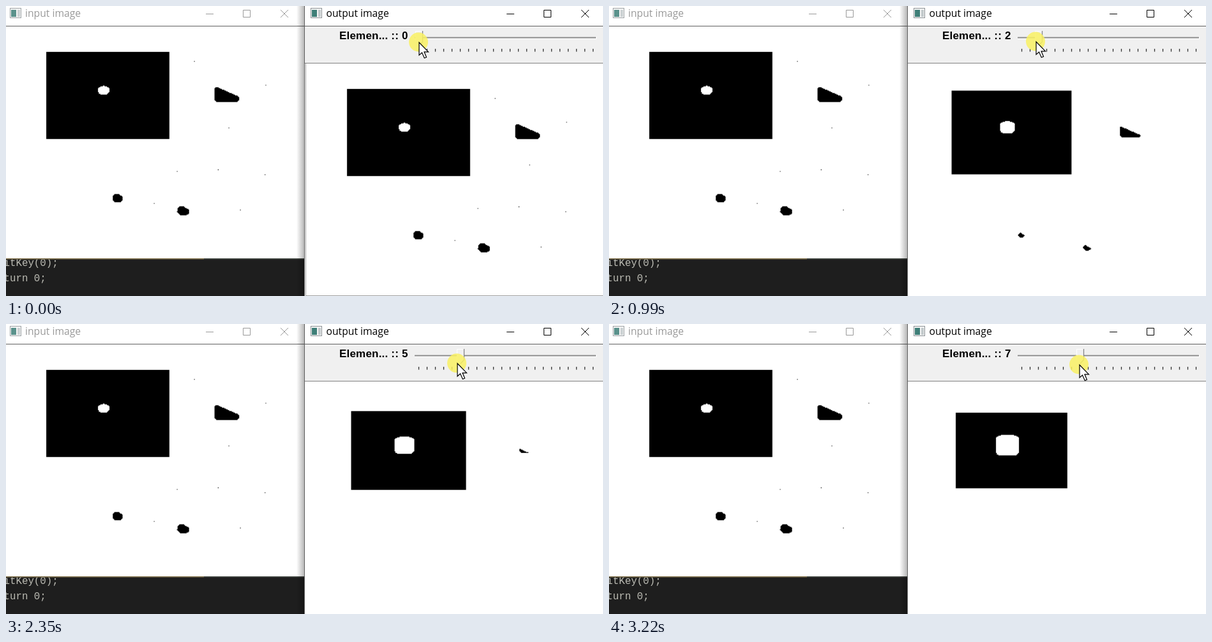
An HTML page with a canvas for the animation above (3.43 s loop, 935x454 px).

```html
<!DOCTYPE html>
<html lang="en">
<head>
<meta charset="utf-8">
<title>Dilation slider</title>
<style>
  html, body { margin: 0; width: 100%; height: 100%; overflow: hidden; background: #fff; }
  canvas, svg { position: absolute; display: block; }
  #inputView { left: 0; top: 32px; }
  #outputView { left: 471px; top: 90px; }
  svg { left: 0; top: 0; }
  text { white-space: pre; }
  .title { font: 15.7px "Open Sans", "Noto Sans", sans-serif; }
  .label { font: bold 17px "Liberation Sans", sans-serif; letter-spacing: .2px; }
  .code { font: 15.8px "Liberation Mono", monospace; fill: #bcbcb4; }
</style>
</head>
<body>
<canvas id="inputView" width="466" height="363"></canvas>
<canvas id="outputView" width="464" height="364"></canvas>
<svg width="935" height="454" viewBox="0 0 935 454">
  <defs>
    <linearGradient id="shade">
      <stop offset="0" stop-color="#000" stop-opacity="0"/>
      <stop offset="1" stop-color="#000" stop-opacity=".28"/>
    </linearGradient>
    <g id="icon">
      <rect x=".5" y=".5" width="17" height="15" fill="#f4f4f4" stroke="#8c9296"/>
      <rect x="2" y="3" width="8" height="11" fill="#3f7f78"/>
      <rect x="12" y="3" width="4" height="11" fill="#c3cacc"/>
    </g>
    <g id="buttons" fill="none">
      <path d="M0 12.5H12M58.500 6.500H69.500V17.500H58.500ZM117 6L129 18M129 6L117 18"/>
    </g>
  </defs>

  <!-- editor behind the windows -->
  <rect y="396" width="467" height="58" fill="#1e1e1e"/>
  <text class="code" x="-22.5" y="407">waitKey(0);</text>
  <text class="code" x="-22.5" y="431">return 0;</text>

  <!-- input window -->
  <rect width="467" height="31" fill="#fff"/>
  <rect y="31" width="467" height="1" fill="#5f5f5f"/>
  <rect y="395" width="467" height="1.500" fill="#4a4f4a"/>
  <rect y="395" width="310" height="1.500" fill="#80704a"/>
  <use href="#icon" x="6" y="3" opacity=".85"/>
  <text class="title" x="30" y="17" fill="#999">input image</text>
  <use href="#buttons" x="313" stroke="#999"/>
  <rect x="455" width="12" height="454" fill="url(#shade)"/>

  <!-- output window -->
  <rect x="468" width="467" height="31" fill="#fff"/>
  <rect x="468" y="32" width="467" height="57" fill="#f0f0f0"/>
  <path d="M467.500 0V454M468 31.500H935" stroke="#5f5f5f"/>
  <path d="M468 89.500H935" stroke="#828282"/>
  <path id="frame" d="M469.500 454V90M470 453.500H935" fill="none" stroke="#a0a0a0"/>
  <use href="#icon" x="477" y="3"/>
  <text class="title" x="501.500" y="17" fill="#000">output image</text>
  <use href="#buttons" x="784" stroke="#000"/>

  <!-- slider -->
  <text class="label" id="label" x="522" y="52"></text>
  <rect x="640" y="48" width="285" height="4" fill="#fff"/>
  <rect x="640" y="48.500" width="284" height="2" fill="#8a8a8a"/>
  <path id="ticks" stroke="#333" stroke-width="1.300"/>
  <g id="thumb">
    <path d="M641 39H652.500V56L647 62L641 56Z" fill="#f0f0f0"/>
    <path d="M652 39.500H641.500V56" fill="none" stroke="#fff"/>
    <path d="M652.500 39V56L647 62" fill="none" stroke="#858585" stroke-width="1.300"/>
  </g>
  <g id="pointer">
    <circle cx="-1" cy="-.5" r="15" fill="#f9f163" opacity=".85"/>
    <path d="M0 0V20L4.500 16L8.300 24.500L11.500 23.200L8 14.800H14.500Z" fill="#fff" stroke="#000" stroke-width="1.200"/>
  </g>
</svg>
<script>
const LOOP = 3430, ZOOM = 9 / 7, W = 364, H = 284, LEVELS = 8;
const $ = id => document.getElementById(id);

// Pointer drags: start time, end time, steps, from x, from y, to x, to y
const drags = [
  [0, 0, 1, 647, 57, 647, 57],
  [30, 280, 8, 648, 57, 658, 57],
  [590, 990, 10, 659, 57, 669, 56],
  [1160, 1340, 6, 671, 56, 689, 60],
  [1790, 1930, 5, 690, 60, 700, 61],
  [2250, 2420, 6, 701, 61, 716, 63],
  [2760, 3220, 12, 721, 63, 737, 64]
];

const blobs = [
  [327, 128, 331, 127, 334, 128.4, 363, 141, 365, 144, 365, 147, 362, 150, 329, 150, 327, 148],
  [168, 296, 171, 294, 176, 294, 183, 299, 183, 304, 180, 307, 170, 307, 167, 303],
  [269, 317, 272, 314, 278, 314, 287, 319, 287, 324, 284, 327, 272, 327, 268, 322]
];
const specks = [[295, 86], [407, 123], [348, 190], [267, 258], [332, 256], [405, 264], [231, 309], [366, 319]];

function makeCanvas() {
  const c = document.createElement("canvas");
  c.width = W;
  c.height = H;
  return c;
}

// Binary picture as a grey array, in unscaled pixels
function drawBase() {
  const ctx = makeCanvas().getContext("2d", { willReadFrequently: true });
  ctx.fillStyle = "#fff";
  ctx.fillRect(0, 0, W, H);
  ctx.scale(1 / ZOOM, 1 / ZOOM);
  ctx.translate(0, -32);
  ctx.fillStyle = "#000";
  ctx.fillRect(63, 72, 193, 136);
  for (const p of blobs) {
    ctx.beginPath();
    for (let i = 0; i < p.length; i += 2) ctx.lineTo(p[i], p[i + 1]);
    ctx.fill();
  }
  ctx.fillStyle = "#fff";
  ctx.beginPath();
  ctx.ellipse(153, 132, 9.6, 7, 0, 0, 7);
  ctx.fill();
  const data = ctx.getImageData(0, 0, W, H).data;
  const grey = Uint8Array.from({ length: W * H }, (_, i) => data[i * 4] > 127 ? 255 : 0);
  for (const [x, y] of specks)
    grey[Math.floor((y + .5 - 32) / ZOOM) * W + Math.floor((x + .5) / ZOOM)] = 40;
  return grey;
}

// Brightest value in each 3 by 3 neighbourhood
function dilate(src) {
  const out = src.slice();
  for (let y = 1; y < H - 1; y++)
    for (let x = 1; x < W - 1; x++) {
      let max = 0;
      for (let dy = -W; dy <= W; dy += W)
        for (let dx = -1; dx <= 1; dx++)
          max = Math.max(max, src[y * W + x + dy + dx]);
      out[y * W + x] = max;
    }
  return out;
}

function toCanvas(grey) {
  const c = makeCanvas(), ctx = c.getContext("2d"), img = ctx.createImageData(W, H);
  grey.forEach((v, i) => img.data.set([v, v, v, 255], i * 4));
  ctx.putImageData(img, 0, 0);
  return c;
}

function show(view, picture) {
  view.getContext("2d").drawImage(picture, 0, 0, W * ZOOM, H * ZOOM);
}

const pictures = [];
for (let k = 0, grey = drawBase(); k < LEVELS; k++, grey = dilate(grey)) pictures.push(toCanvas(grey));
show($("inputView"), pictures[0]);

$("ticks").setAttribute("d", Array.from({ length: 22 }, (_, i) => `M${646.5 + 13 * i} 67V71.500`).join(""));

function pointerAt(t) {
  const [start, end, steps, x0, y0, x1, y1] = drags.filter(d => d[0] <= t).pop();
  const last = steps - 1;
  const step = end > start ? Math.min(last, Math.floor((t - start) / (end - start) * last)) : 0;
  const f = last ? step / last : 0;
  return [x0 + (x1 - x0) * f, y0 + (y1 - y0) * f];
}

let shown = -1;
function render(t) {
  const [x, y] = pointerAt(t);
  const level = Math.round((x - 646) / 13);
  $("pointer").setAttribute("transform", `translate(${x} ${y})`);
  if (level === shown) return;
  shown = level;
  $("label").textContent = "Elemen... :: " + level;
  $("thumb").setAttribute("transform", `translate(${13 * level} 0)`);
  $("frame").setAttribute("visibility", level ? "hidden" : "visible");
  show($("outputView"), pictures[level]);
}

const began = performance.now();
function tick() {
  render((performance.now() - began) % LOOP);
  requestAnimationFrame(tick);
}
tick();
</script>
</body>
</html>
```
